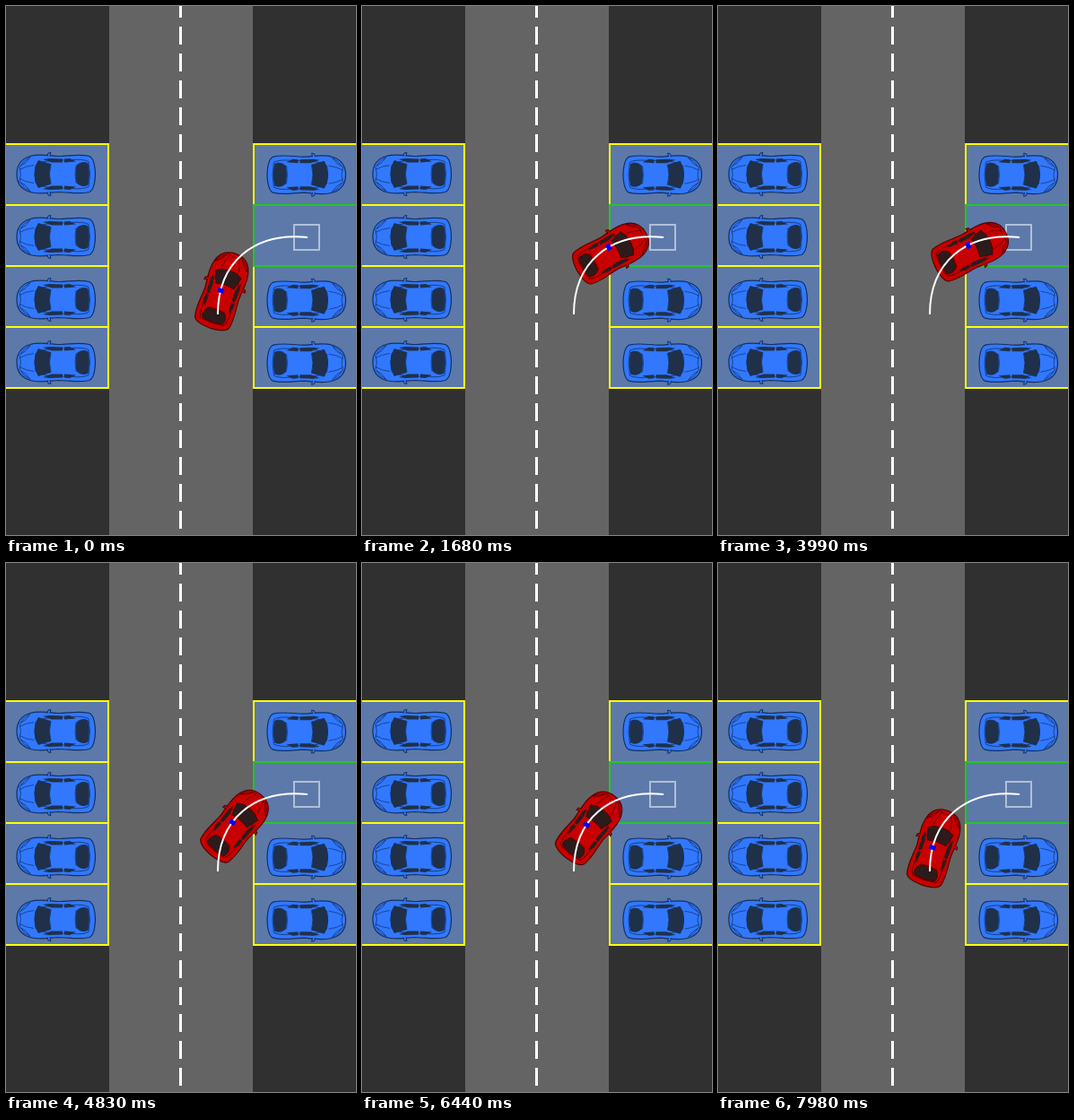
Animation, 390 px wide and 590 px high, one loop 8000 ms. Source, as an HTML page with a canvas:

```html
<!DOCTYPE html>
<html lang="en">
<head>
<meta charset="utf-8">
<title>Parking manoeuvre</title>
<style>
html, body { margin: 0; width: 100%; height: 100%; overflow: hidden; background: #303030; }
canvas { display: block; }
</style>
</head>
<body>
<canvas id="stage" width="390" height="590"></canvas>
<script>
const ctx = document.getElementById('stage').getContext('2d');
const LOOP = 8000, STEP = 70;

// Distance driven along the turning circle: [ms, px]
const drive = [[0, 0], [1610, 58], [2800, 58], [3990, 62], [5670, -2.7], [6840, 42], [7140, 31.5], [7980, 0], [8000, 0]];
const turn = { x: 316.8, y: 343.9, r: 79.6, start: 71 * Math.PI / 180 };
const path = [[236, 344], [236, 286], [276, 252], [336, 258]];

function distanceAt(t) {
  const i = drive.findIndex((k, n) => n > 0 && t <= k[0]);
  const [t0, s0] = drive[i - 1], [t1, s1] = drive[i];
  return s0 + (s1 - s0) * (t - t0) / (t1 - t0);
}

function poseAt(t) {
  const a = turn.start - distanceAt(t) / turn.r;
  return { x: turn.x - turn.r * Math.sin(a), y: turn.y - turn.r * Math.cos(a), angle: -a };
}

function pathPoint(u) {
  const v = 1 - u;
  const w = [v * v * v, 3 * v * v * u, 3 * v * u * u, u * u * u];
  return [0, 1].map(axis => path.reduce((sum, p, i) => sum + w[i] * p[axis], 0));
}

function nearestOnPath(x, y) {
  let best = 0, least = Infinity;
  for (let u = 0; u <= 1; u += 0.005) {
    const p = pathPoint(u), d = Math.hypot(p[0] - x, p[1] - y);
    if (d < least) { least = d; best = u; }
  }
  return best;
}

function rect(x, y, w, h, color) {
  ctx.fillStyle = color;
  ctx.fillRect(x, y, w, h);
}

function shape(d, fill, stroke, width = 0.8) {
  const p = new Path2D(d);
  if (fill) { ctx.fillStyle = fill; ctx.fill(p); }
  if (stroke) { ctx.strokeStyle = stroke; ctx.lineWidth = width; ctx.stroke(p); }
}

// Car seen from above, nose to the right
function car(x, y, angle, c) {
  ctx.save();
  ctx.translate(x, y);
  ctx.rotate(angle);
  shape('M-37-20C-25-23-14-20-2-20C10-21 20-23 29-20C39-17 44-10 44 0C44 10 39 17 29 20C20 23 10 21-2 20C-14 20-25 23-37 20Q-43 17-43.5 0Q-43-17-37-20Z', c.body, c.line, 1.2);
  shape('M-36-14Q-30-17-18-16L6-15Q17-14 23-10Q25 0 23 10Q17 14 6 15L-18 16Q-30 17-36 14Q-39 0-36-14Z', null, c.line);
  shape('M6-11L20-15Q24-8 24 0Q24 8 20 15L6 11Q9 0 6-11Z', c.glass, c.line);
  shape('M-35-12Q-29-15-23-10Q-21 0-23 10Q-29 15-35 12Q-38 0-35-12Z', c.glass, c.line);
  for (const side of [-1, 1]) {
    ctx.save();
    ctx.scale(1, side);
    shape('M-22 14L-9 13L-9 17L-15 17.5ZM-7 13L5 13L15 16.5L8 17.5L-7 17Z', c.glass);
    shape('M7 20L6 24L9 23.5L10 20', c.body, c.line, 1);
    shape('M25 10Q34 9 41 5M29 19Q37 15 40 9L34 13Z', null, c.line, 0.7);
    ctx.restore();
  }
  shape('M-22-10Q-20 0-22 10M41-9Q38 0 41 9', null, c.line, 0.7);
  ctx.restore();
}

const blue = { body: '#3178ff', glass: '#203048', line: '#14305f' };
const red = { body: '#c80000', glass: '#2c1b1b', line: '#500000' };

function slots(x, edge) {
  rect(x, 154, 115, 272, '#5c79aa');
  for (let y = 153; y <= 425; y += 68) rect(x, y, 115, 2, '#ffff00');
  rect(edge, 153, 2, 274, '#ffff00');
}

function scene() {
  rect(0, 0, 390, 590, '#303030');
  rect(115, 0, 160, 590, '#646464');
  for (let y = -7; y < 590; y += 30) rect(193, y, 3, 20, '#ffffff');
  slots(0, 113);
  slots(275, 275);
  ctx.lineWidth = 2;
  ctx.strokeStyle = '#22c822';
  ctx.strokeRect(276, 222, 120, 68);
  ctx.strokeStyle = '#b0bfd7';
  ctx.strokeRect(321, 244, 28, 28);
  for (let i = 0; i < 4; i++) {
    const y = 187.5 + 70 * i;
    car(56, y, Math.PI, blue);
    if (i !== 1) car(334.5, y + 0.7, 0, blue);
  }
}

function draw(t) {
  scene();
  const p = poseAt(t);
  car(p.x, p.y, p.angle, red);

  ctx.beginPath();
  ctx.moveTo(...path[0]);
  ctx.bezierCurveTo(...path.slice(1).flat());
  ctx.strokeStyle = '#ffffff';
  ctx.lineWidth = 2;
  ctx.stroke();

  const u = nearestOnPath(p.x, p.y);
  const [x, y] = pathPoint(u), [nx, ny] = pathPoint(u + 0.01);
  ctx.save();
  ctx.translate(x, y);
  ctx.rotate(Math.atan2(ny - y, nx - x));
  rect(-2.5, -3.5, 5, 7, '#0000ff');
  ctx.restore();
}

function tick() {
  const t = performance.now() % LOOP;
  draw(Math.floor(t / STEP) * STEP);
  requestAnimationFrame(tick);
}
tick();
</script>
</body>
</html>
```
